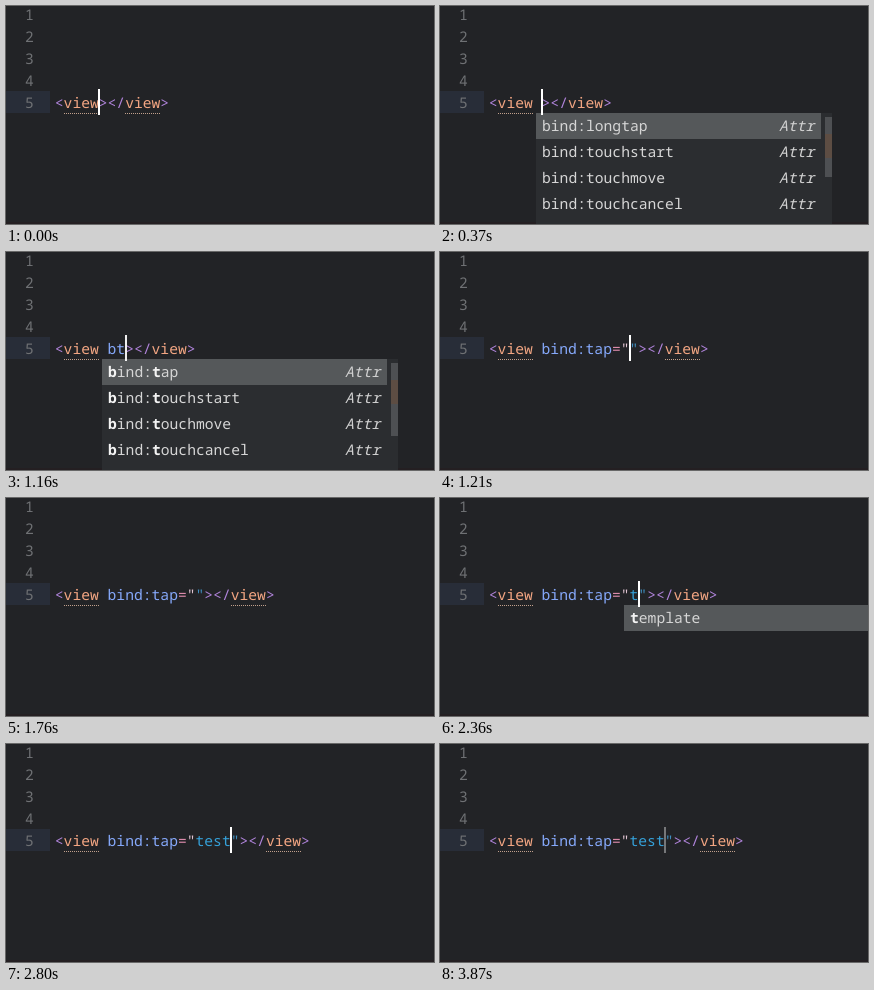
Recreate the animation shown at these times as an HTML page. Size 428 by 218 pixels, loop 3930 ms.

```html
<!DOCTYPE html>
<html lang="en">
<head>
<meta charset="utf-8">
<title>Attribute completion</title>
<style>
  html, body { margin: 0; width: 100%; height: 100%; overflow: hidden; background: #222326; }
  svg { display: block; width: 428px; height: 218px; }
  text {
    font: 14.667px "Noto Sans Mono", "DejaVu Sans Mono", monospace;
    white-space: pre;
    text-rendering: geometricPrecision;
  }
  .match { font-weight: 700; fill: #f4f4f4; }
</style>
</head>
<body>
<svg viewBox="0 0 428 218">
  <rect width="428" height="218" fill="#222326"/>
  <rect y="216" width="428" height="2" fill="#241f22"/>
  <rect y="85" width="44" height="22" fill="#282d38"/>
  <g id="gutter" fill="#6f7174"></g>
  <g id="code"></g>
  <g id="popup"></g>
  <rect id="caret" y="83" width="2" height="26" fill="#fff"/>
</svg>
<script>
const LOOP = 3930, X0 = 48.8, CHAR = 8.8, ROW = 26, TOP = 107;
const INK = { tag: '#b184dc', name: '#f3a683', attr: '#86a9fb', eq: '#dc8bab',
              open: '#e3c6d4', value: '#35a0d8', close: '#3f8fc0' };
const $ = id => document.getElementById(id);

// [start ms, attribute text, value text or null, caret column]
const EDITS = [
  [0, '', null, 5], [320, ' ', null, 6], [600, ' b', null, 7], [740, ' bt', null, 8],
  [1210, ' bind:tap', '', 16], [2220, ' bind:tap', 't', 17], [2430, ' bind:tap', 'te', 18],
  [2700, ' bind:tap', 'tes', 19], [2800, ' bind:tap', 'test', 20]
];

// [start ms, menu kind, matched letters, thumb height]
const MENUS = [
  [0, ''], [370, 'longtap', '', 60], [600, 'longtap', 'b', 82], [780, 'tap', 'bt', 73],
  [1210, ''], [2290, 'template', 't'], [2500, 'template', 'te'], [2750, '']
];

// [start ms, caret opacity]
const BLINK = [
  [0, 1], [40, .7], [90, .3], [140, 0], [320, 1], [1160, .92], [1210, 1],
  [1620, .7], [1690, .3], [1760, 0], [2220, 1],
  [3210, .85], [3270, .5], [3340, .2], [3410, 0], [3870, .38]
];

const at = (list, t) => list.filter(e => e[0] <= t).pop();
const esc = s => s.replace(/&/g, '&amp;').replace(/</g, '&lt;');
const span = (s, kind) => `<tspan fill="${INK[kind]}">${esc(s)}</tspan>`;
const label = (x, y, body, more = '') => `<text x="${x}" y="${y}" ${more}>${body}</text>`;
const box = (x, y, w, h, fill, more = '') =>
  `<rect x="${x}" y="${y}" width="${w}" height="${h}" fill="${fill}" ${more}/>`;

function dots(col) {
  const x = Math.round(X0 + col * CHAR);
  return `<path d="M${x} 107.5h35" stroke="#c2a08c" stroke-dasharray="1 1"/>`;
}

function codeLine([, attr, value]) {
  const quoted = value === null ? '' :
    span('=', 'eq') + span('"', 'open') + span(value, 'value') + span('"', 'close');
  const closeCol = 8 + attr.length + (value === null ? 0 : value.length + 3);
  return label(X0, 102, span('<', 'tag') + span('view', 'name') + span(attr, 'attr') + quoted +
    span('></', 'tag') + span('view', 'name') + span('>', 'tag')) + dots(1) + dots(closeCol);
}

// Emphasise the typed letters, in order, inside a suggestion.
function emphasise(word, typed) {
  let i = 0;
  return [...word].map(c => c === typed[i] ? (i++, `<tspan class="match">${c}</tspan>`) : c).join('');
}

function menu([, kind, typed, thumb]) {
  if (!kind) return '';
  if (kind === 'template')
    return box(184, TOP, 244, ROW, '#55585a') + label(190, 125, emphasise(kind, typed), 'fill="#d6d6d6"');
  const words = [kind, 'touchstart', 'touchmove', 'touchcancel'];
  const rows = words.map((w, i) => {
    const y = 125 + i * ROW;
    return label(102, y, emphasise('bind:' + w, typed), 'fill="#d6d6d6"') +
      label(339, y, 'Attr', 'fill="#d0d0d0" font-style="italic" style="font-style:italic"');
  });
  return box(96, TOP, 296, 111, '#2b2d30') + box(96, TOP, 285, ROW, '#55585a') +
    box(385, 111, 7, thumb, '#4e5053') + box(385, 128, 7, 24, '#5d4d43') + rows.join('');
}

$('gutter').innerHTML = [1, 2, 3, 4, 5].map(n => label(19, n * 22 - 8, n)).join('');

let lastEdit, lastMenu;
function draw(t) {
  const edit = at(EDITS, t), list = at(MENUS, t);
  if (edit !== lastEdit) $('code').innerHTML = codeLine(lastEdit = edit);
  if (list !== lastMenu) $('popup').innerHTML = menu(lastMenu = list);
  $('caret').setAttribute('x', Math.floor(X0 + edit[3] * CHAR));
  $('caret').setAttribute('opacity', at(BLINK, t)[1]);
}

const start = performance.now();
function tick() {
  draw((performance.now() - start) % LOOP);
  requestAnimationFrame(tick);
}
tick();
</script>
</body>
</html>
```
